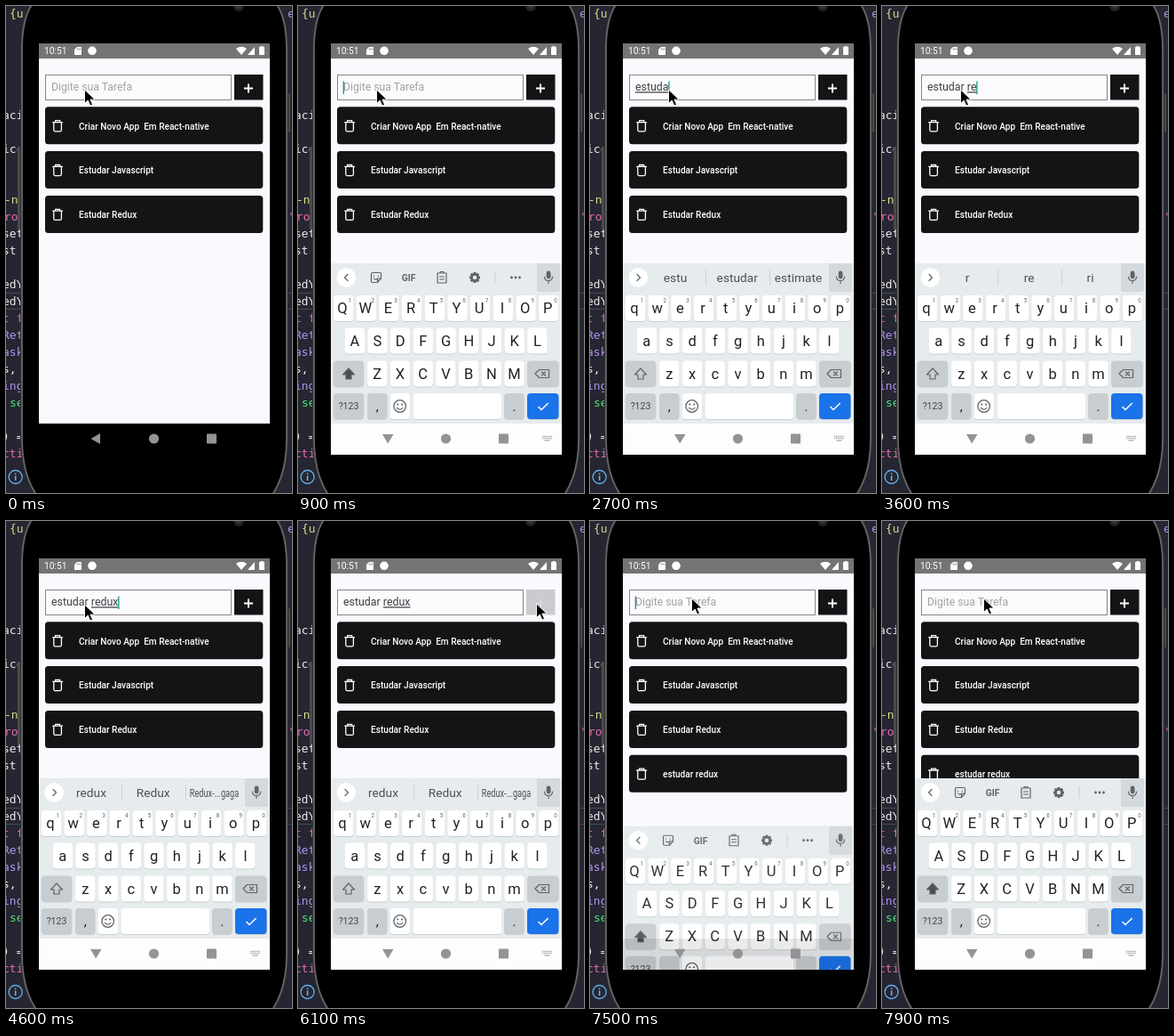
These frames come from a looping animation (322x547 px, 8 s). An HTML page:

```html
<!DOCTYPE html>
<html lang="pt">
<head>
<meta charset="utf-8">
<title>Lista de tarefas</title>
<style>
html, body { margin: 0; width: 100%; height: 100%; overflow: hidden; background: #252631; }
svg { display: block; }
text { font-family: Roboto, sans-serif; white-space: pre; }
.code text { font: 13px "DejaVu Sans Mono", monospace; }
.mid { text-anchor: middle; }
.line { fill: none; stroke: #5f6368; stroke-width: 1.2; stroke-linejoin: round; stroke-linecap: round; }
#word { text-decoration: underline; text-decoration-thickness: .8px; }
</style>
</head>
<body>
<svg id="stage" width="322" height="547" viewBox="0 0 322 547"></svg>
<script>
const LOOP = 8000, KB_H = 215;
const stage = document.getElementById('stage');
const $ = id => document.getElementById(id);

const rect = (x, y, w, h, fill, r = 0, more = '') =>
  `<rect x="${x}" y="${y}" width="${w}" height="${h}" rx="${r}" fill="${fill}" ${more}/>`;
const circle = (x, y, r, fill, more = '') =>
  `<circle cx="${x}" cy="${y}" r="${r}" fill="${fill}" ${more}/>`;
const path = (d, more = 'class="line"') => `<path d="${d}" ${more}/>`;
const label = (x, y, size, fill, s, more = '') =>
  `<text x="${x}" y="${y}" font-size="${size}" fill="${fill}" ${more}>${s}</text>`;
const group = (id, body, more = '') => `<g id="${id}" ${more}>${body}</g>`;

// Editor behind the phone
function editor() {
  const pink = '#e86bb2', violet = '#b493ee', white = '#eeeeea', green = '#50e27a', yellow = '#d9dc8a';
  const lines = [
    [4, 13, yellow, '{u'], [-4, 127, white, 'aci'], [-4, 165, white, 'ico'],
    [-2, 222, yellow, '-n'], [-2, 241, pink, 'ro'], [-4, 260, white, 'set'],
    [-4, 279, white, 'st'], [-4, 317, white, 'edY'], [-4, 336, white, 'edY'],
    [-4, 355, pink, 't f'], [-4, 374, violet, 'Ret'], [-4, 393, violet, 'ask'],
    [-4, 412, white, 's,'], [-4, 431, violet, 'ing'], [4, 450, green, 'se'],
    [-4, 488, white, ') ='], [-4, 507, pink, 'cti'], [317, 13, violet, 'e'], [317, 241, pink, "'"]
  ];
  return rect(0, 0, 322, 547, '#252631') +
    rect(-2, 322.5, 326, 18, 'none', 0, 'stroke="#464957"') +
    `<g class="code">${lines.map(([x, y, c, s]) => label(x, y, 13, c, s)).join('')}</g>` +
    circle(10.7, 529, 7.5, 'none', 'stroke="#62b0e8" stroke-width="1.3"') +
    rect(9.9, 527.5, 1.6, 5.5, '#62b0e8') + rect(9.9, 524.5, 1.6, 1.7, '#62b0e8');
}

function phone() {
  const body = 'M33 -6C23 4 18 24 18 50V486C18 514 25 538 38 554H296C309 538 316 514 316 486V50C316 24 311 4 301 -6Z';
  return rect(13, 158, 5, 93, '#4a4a4c', 1.5) + rect(316, 98, 4, 44, '#4a4a4c', 1.5) +
    path(body, 'fill="#000" stroke="#2c2c2f" stroke-width="4"') +
    path(body, 'fill="#000" stroke="#666669" stroke-width="1.8"') +
    circle(262, 0, 6, '#222226') + circle(262, 0, 3, '#34343a');
}

function statusBar() {
  return rect(37, 42, 260, 17, '#757475') + label(43, 54, 10.3, '#fff', '10:51') +
    path('M80 46H85V55H77V49Z', 'fill="#fff"') +
    path('M80.3 47.5V49.5M82 47.5V49.5M83.7 47.5V49.5', 'stroke="#757475" stroke-width=".8"') +
    circle(97, 50.3, 4.8, '#fff') +
    path('M259 48Q265 43.5 271 48L265 55Z', 'fill="#fff"') +
    path('M272 55L280 46V55Z', 'fill="#fff"') +
    path('M286.5 46V45H289.5V46H291V55H285V46Z', 'fill="#fff"');
}

function item(i, s) {
  const y = 113 + i * 49.8;
  return `<g transform="translate(0 ${y})">` + rect(44, 0.3, 245.3, 42, '#131416', 3.5) +
    path('M52.2 17.6H64M55.6 17.3V15.7H60.6V17.3M53.8 18V26.3Q53.8 27.8 55.2 27.8H61Q62.4 27.8 62.4 26.3V18',
      'fill="none" stroke="#fff" stroke-width="1.3"') +
    label(82, 25.5, 10.1, '#fff', s, 'font-weight="500"') + '</g>';
}

function app() {
  return rect(37, 59, 260, 410, '#faf9fd') +
    rect(44.5, 77.5, 209, 28, '#fbfafd', 0, 'stroke="#858487"') +
    label(51, 95.3, 12.2, '#a3a2a5', 'Digite sua Tarefa', 'id="hint"') +
    '<text x="51" y="95.3" font-size="12.4" fill="#3f3f42" id="typed"><tspan id="done"></tspan><tspan id="word"></tspan></text>' +
    rect(0, 84.5, 1.3, 14.5, '#159a80', 0, 'id="caret"') +
    group('add', rect(257, 77, 32.5, 28.5, '#131416') +
      path('M268 92.5H278M273 87.5V97.5', 'id="plus" stroke="#fff" stroke-width="2"')) +
    ['Criar Novo App  Em React-native', 'Estudar Javascript', 'Estudar Redux']
      .map((s, i) => item(i, s)).join('') + group('added', item(3, 'estudar redux'));
}

// Keyboard
const key = (x, y, w, fill = '#fff') =>
  rect(x, y + 1, w, 29, '#c9cfd3', 4) + rect(x, y, w, 29, fill, 4);

function letters() {
  const rows = [['qwertyuiop', 51, 325], ['asdfghjkl', 63.8, 361.5], ['zxcvbnm', 89.3, 398.5]];
  return rows.map(([s, x0, y], r) => [...s].map((c, i) => {
    const x = x0 + i * 25.7;
    return key(x - 11.2, y, 22.4) +
      label(x - (r ? 0 : 1), y + 20, 16.5, '#202124', c, 'class="mid letter"') +
      (r ? '' : label(x + 7.6, y + 8, 6.3, '#5f6368', (i + 1) % 10, 'class="mid"'));
  }).join('')).join('');
}

function tools() {
  const dots = [240.5, 245, 249.5].map(x => circle(x, 305, 1.4, '#5f6368')).join('');
  const teeth = [...Array(8)].map((_, i) =>
    rect(197.5, 299, 3, 3, '#5f6368', .5, `transform="rotate(${i * 45} 199 305)"`)).join('');
  return path('M82.5 301Q82.5 299.5 84 299.5H92Q93.5 299.5 93.5 301V306L89.5 310.5H84Q82.5 310.5 82.5 309ZM93.5 306H89.5V310.5M85.5 303V303.5M90.5 303V303.5M85.5 306Q87 308 89 306.5') +
    label(124.5, 309, 10.3, '#5f6368', 'GIF', 'class="mid" font-weight="700"') +
    path('M157 300H167V311H157ZM160 300V298.5H164V300M159.5 304H164.5M159.5 307H164.5') +
    teeth + circle(199, 305, 3.5, 'none', 'stroke="#5f6368" stroke-width="2.4"') +
    rect(221.5, 298, 1, 14, '#cbd0d3') + dots;
}

function keyboard() {
  const grey = '#c7cdd1';
  return rect(37, 289, 260, 180, '#e6ebee') + rect(37, 469, 260, 35, '#fdfdfe') +
    rect(269, 289, 26, 32, '#d4d9dd', 2) +
    circle(54.3, 305, 10.7, '#fff') + path('', 'id="chevron" class="line"') +
    group('tools', tools()) +
    group('words', [96, 165.7, 234.5].map((x, i) =>
      `<g transform="translate(${x} 310.3)"><text id="w${i}" class="mid" font-size="13.7" fill="#4b5054"></text></g>`).join('') +
      rect(130, 296, 1, 18, '#cbd0d3') + rect(202, 296, 1, 18, '#cbd0d3')) +
    rect(279.7, 297.5, 4.8, 9, '#5f6368', 2.4) + path('M277.5 304Q277.5 308.5 282 308.5Q286.5 308.5 286.5 304M282 309V311.5') +
    letters() + key(39.8, 398.5, 34.4, grey) + key(258, 398.5, 35.5, grey) +
    path('M57 407L50.5 414H54V419H60V414H63.5Z', 'id="shift" class="line"') +
    path('M271.5 408.5H282.5V417.5H271.5L267 413ZM274.5 411L278.5 415M278.5 411L274.5 415') +
    key(39.8, 435, 34.4, grey) + label(57, 453.3, 10.5, '#40454a', '?123', 'class="mid"') +
    key(78, 435, 22.4, grey) + label(89.2, 455, 15, '#202124', ',', 'class="mid"') +
    key(103.7, 435, 22.4) + circle(114.7, 449.5, 6.8, 'none', 'stroke="#5f6368" stroke-width="1.3"') +
    circle(112.3, 447.5, 1.1, '#5f6368') + circle(117.1, 447.5, 1.1, '#5f6368') +
    path('M111.5 451.3Q114.7 455 117.9 451.3') +
    key(129.5, 435, 99.5) + key(232.2, 435, 22.4, grey) +
    label(243.4, 455, 15, '#202124', '.', 'class="mid"') + key(258, 435, 35.5, '#1a73e8') +
    path('M270.5 450L274 453.5L281.7 446', 'fill="none" stroke="#fff" stroke-width="1.6"') +
    path('M275 483.5H286M275 485.7H286', 'stroke="#a5a5a7" stroke-width="1.3" stroke-dasharray="1.3 .7"') +
    path('M277.5 488H283.5', 'stroke="#a5a5a7" stroke-width="1.2"');
}

const navIcons = () => path('', 'id="back" fill="#939395"') + circle(166.5, 486, 5.6, '#939395') +
  rect(226, 480.5, 11, 11, '#939395', .8);

stage.innerHTML = '<defs><clipPath id="screen"><rect x="37" y="42" width="260" height="462"/></clipPath></defs>' +
  editor() + phone() +
  `<g clip-path="url(#screen)">${app()}${rect(37, 469, 260, 35, '#000')}${group('kb', keyboard())}${navIcons()}${statusBar()}</g>` +
  path('M0 0V15.5L3.7 12L6.3 18L9 16.8L6.4 11H11.5Z', 'id="mouse" fill="#000" stroke="#fff" stroke-width=".9"');

// Timeline: [start ms, committed text, word being typed]
const typing = [
  [0, '', ''], [1800, '', 'e'], [2200, '', 'es'], [2500, '', 'est'], [2600, '', 'estu'],
  [2700, '', 'estuda'], [2900, '', 'estudar'], [3400, 'estudar ', ''], [3500, 'estudar ', 'r'],
  [3600, 'estudar ', 're'], [3800, 'estudar ', 'red'], [4000, 'estudar ', 'redu'],
  [4200, 'estudar ', 'redux'], [6300, '', '']
];
const hints = [
  [2000, 'e', 'em', 'eu'], [2300, 'es', 'esta', 'estou'], [2600, 'estu', 'estudar', 'estimate'],
  [3000, 'estudar', 'estudo', 'estudante'], [3400, 'o', 'para', 'com'], [3600, 'r', 're', 'ri'],
  [3800, 're', 'red', 'rede'], [4000, 'red', 'Redux', 'Redux-...gaga'],
  [4300, 'redu', 'Redux', 'Redux-...gaga'], [4600, 'redux', 'Redux', 'Redux-...gaga']
];
const mouseKeys = [
  [0, 88.5, 94], [4600, 88.5, 94], [4700, 127, 91], [4800, 127, 91], [5000, 190, 95], [5200, 250, 98],
  [5300, 262, 95], [5400, 262, 95], [5500, 268.5, 93], [6200, 268.5, 93], [6600, 114.5, 87], [LOOP, 114.5, 87]
];
const blinks = [[100, 500], [700, 1100], [1300, 1600], [1800, 5200], [5700, 6100], [7400, 7900]];

const within = (t, a, b) => t >= a && t < b;
const latest = (list, t) => list.filter(k => k[0] <= t).pop();
const show = (id, on) => $(id).setAttribute('display', on ? 'inline' : 'none');
const set = (id, name, value) => $(id).setAttribute(name, value);

function mouseAt(t) {
  const i = mouseKeys.findIndex(k => k[0] > t);
  const [a, x0, y0] = mouseKeys[i - 1], [b, x1, y1] = mouseKeys[i];
  const p = (t - a) / (b - a);
  return [x0 + (x1 - x0) * p, y0 + (y1 - y0) * p];
}

// Share of the keyboard that is up, 0 to 1
function raised(t) {
  const rise = (a, d) => 1 - (1 - Math.min(1, Math.max(0, (t - a) / d))) ** 2;
  if (t < 6400) return rise(400, 500);
  if (t < 7300) return 1 - Math.min(1, ((t - 6400) / 309) ** 2);
  return rise(7300, 400);
}

function draw(time) {
  const t = Math.floor(time / 100) * 100;
  const [, done, word] = latest(typing, t);
  $('done').textContent = done;
  $('word').textContent = word;
  show('hint', !done && !word);
  show('caret', blinks.some(([a, b]) => within(t, a, b)));
  set('caret', 'x', 50.7 + (done || word ? $('typed').getComputedTextLength() : 0));

  const pressed = within(t, 5700, 6300);
  set('add', 'opacity', pressed ? .2 : 1);
  set('plus', 'opacity', pressed ? .3 : 1);
  show('added', t >= 6300);

  const up = raised(t), lower = within(t, 2000, 7000);
  set('kb', 'transform', `translate(0 ${KB_H * (1 - up)})`);
  set('kb', 'opacity', .68 + .32 * up);
  show('kb', up > 0);
  set('back', 'd', up > .5 ? 'M95 481H107.5L101.2 491.5Z' : 'M106 480V492L95.5 486Z');

  show('tools', !lower);
  show('words', lower);
  set('chevron', 'd', lower ? 'M53 301.5L56.5 305L53 308.5' : 'M56 301.5L52.5 305L56 308.5');
  $('shift').style.fill = lower ? 'none' : '#4b5054';
  document.querySelectorAll('.letter').forEach(e => {
    e.textContent = lower ? e.textContent.toLowerCase() : e.textContent.toUpperCase();
  });
  const picks = latest(hints, t) || [0, '', '', ''];
  for (let i = 0; i < 3; i++) {
    $('w' + i).textContent = picks[i + 1];
    set('w' + i, 'transform', picks[i + 1].length > 9 ? 'scale(.67 1)' : 'scale(1)');
  }
  set('mouse', 'transform', `translate(${mouseAt(t).join(' ')})`);
}

const start = performance.now();
function tick() {
  draw((performance.now() - start) % LOOP);
  requestAnimationFrame(tick);
}
tick();
</script>
</body>
</html>
```
